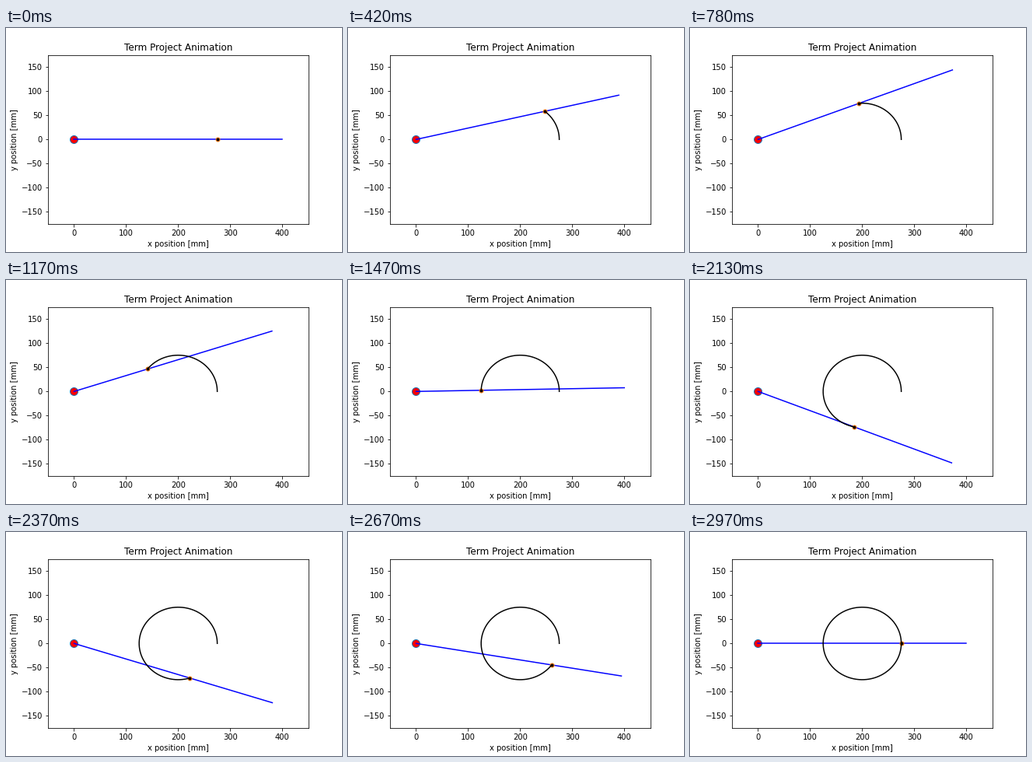
Animation, 432 px wide and 288 px high, one loop 3 s. Source, as a matplotlib script:

```python
import numpy as np
import matplotlib.pyplot as plt
from matplotlib.animation import FuncAnimation

FRAMES = 100
LINK = 400            # arm length, mm
CENTER, RADIUS = 200, 75

theta = np.linspace(0, 2 * np.pi, FRAMES)
pin_x = CENTER + RADIUS * np.cos(theta)
pin_y = RADIUS * np.sin(theta)
arm = np.arctan2(pin_y, pin_x)

fig, ax = plt.subplots(figsize=(6, 4), dpi=72)
fig.subplots_adjust(left=0.125, right=0.9, bottom=0.125, top=0.88)
ax.set(xlim=(-50, 450), ylim=(-175, 175), title="Term Project Animation",
       xlabel="x position [mm]", ylabel="y position [mm]")

ax.plot([0], [0], "o", color="C0", markersize=10, markerfacecolor="red")
link, = ax.plot([], [], color="blue")
pin, = ax.plot([], [], "o", color="C1", markersize=5, markerfacecolor="black")
trace, = ax.plot([], [], color="black")


def update(i):
    link.set_data([0, LINK * np.cos(arm[i])], [0, LINK * np.sin(arm[i])])
    pin.set_data([pin_x[i]], [pin_y[i]])
    trace.set_data(pin_x[:i + 1], pin_y[:i + 1])
    return link, pin, trace


anim = FuncAnimation(fig, update, frames=FRAMES, interval=30, repeat=True,
                     repeat_delay=0)
plt.show()
```
